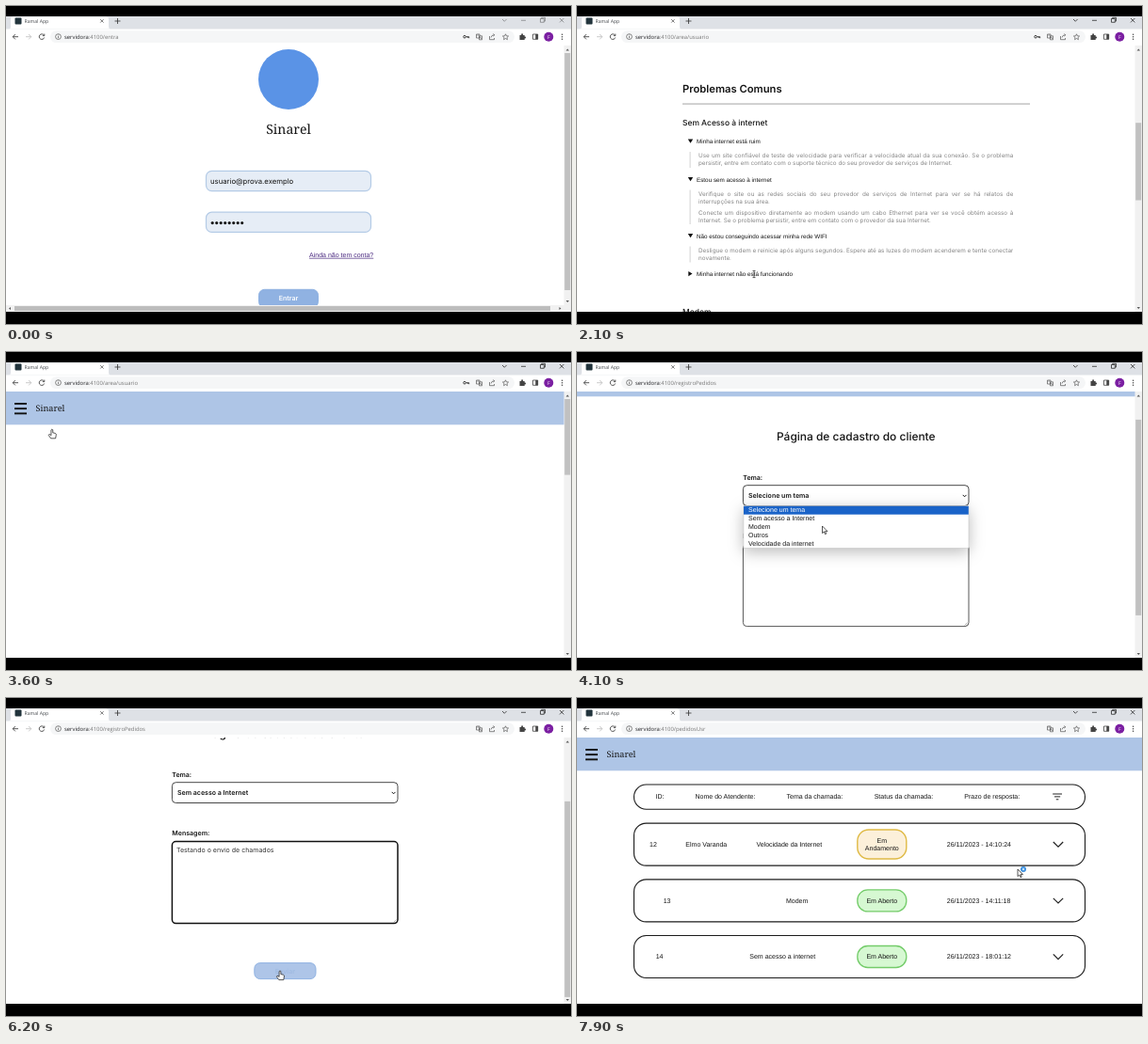
Write an HTML page that moves like this. It is 600 px wide and 338 px high and loops after 8 s.

```html
<!DOCTYPE html>
<html lang="pt-BR">
<head>
<meta charset="utf-8">
<title>Ramal App</title>
<style>
html, body { margin: 0; width: 100%; height: 100%; overflow: hidden; background: #000; }
svg { display: block; width: 100vw; height: 100vh; }
svg, p { text-rendering: geometricPrecision; }
text { font: 7.03px "Liberation Sans", Arial, sans-serif; fill: #151515; white-space: pre; }
.inter, p { font-family: Inter, sans-serif; }
.semi { font-family: Inter, sans-serif; font-weight: 600; }
.medium { font-family: Inter, sans-serif; font-weight: 500; }
.brand { font-family: "Noto Serif", serif; font-weight: 500; }
.ui { font-family: "Open Sans", sans-serif; }
.mid { text-anchor: middle; }
p { margin: 0 0 4.2px; font-size: 6.325px; line-height: 7.65px; color: #858585; text-align: justify; }
.line { fill: none; stroke: #222; stroke-width: 1; }
</style>
</head>
<body>
<svg id="stage" viewBox="0 0 600 338" preserveAspectRatio="none"></svg>
<script>
const LOOP = 8000, STEP = 100;

// ---- markup helpers
const label = (x, y, str, cls = '', size = 7.03, fill = '#151515', id = '') =>
  `<text ${id && `id="${id}"`} x="${x}" y="${y}" class="${cls}" style="font-size:${size}px;fill:${fill}">${str}</text>`;
const box = (x, y, w, h, fill, r = 0, more = '') =>
  `<rect x="${x}" y="${y}" width="${w}" height="${h}" rx="${r}" fill="${fill}" ${more}/>`;
const path = (d, more = '') => `<path d="${d}" class="line" ${more}/>`;
const group = (id, body, more = '') => `<g id="${id}" ${more}>${body}</g>`;

// ---- browser frame
const chrome = () => box(0, 11, 600, 314, '#fff') + box(0, 11, 600, 13.5, '#dee1e6') +
  path('M3 24.5Q5 24.5 5 22V14Q5 11.5 8 11.5H106Q109 11.5 109 14V22Q109 24.5 111 24.5Z', 'style="fill:#fff;stroke:none"') +
  box(9.5, 12.5, 7, 7, '#22343c', 1) +
  label(19.5, 18.2, 'Ramal App', 'ui', 5.1, '#45494d') +
  path('M100.2 14.2l3.4 3.4m0-3.4l-3.4 3.4', 'style="stroke:#444;stroke-width:.7"') +
  path('M118.5 13v6m-3-3h6', 'style="stroke:#333;stroke-width:.8"') +
  group('controls', path('M527 14l2.3 2.3 2.3-2.3M547 15.3h5M567.5 13.5h3.8v3.8h-3.8zM568.7 13.3v-1h3.8v3.8h-1M588 13l4.4 4.4m0-4.4L588 17.4', 'style="stroke-width:.75"')) +
  box(47, 26.3, 493, 12.8, '#f5f6f7', 6.4) +
  path('M13 32.7H7.3m2.6-2.7l-2.7 2.7 2.7 2.7M40.3 31a2.8 2.8 0 1 0 .4 2.5M40.8 29.6v2h-2', 'style="stroke:#444;stroke-width:.9"') +
  path('M21 32.7h5.7m-2.6-2.7l2.7 2.7-2.7 2.7', 'style="stroke:#bbb;stroke-width:.8"') +
  path('M55.5 32v2.3m0-3.7v.7M52.6 32.6a2.9 2.9 0 1 0 5.8 0a2.9 2.9 0 1 0-5.8 0', 'style="stroke:#555;stroke-width:.7"') +
  label(62, 34.9, '', 'ui', 5.9, '#777', 'address') +
  group('key', path('M485.7 32.7a1.3 1.3 0 1 0 2.6 0a1.3 1.3 0 1 0-2.6 0M488.3 32.7h3.4v1.5m-1.4-1.5v1.3', 'style="stroke:#444"')) +
  path('M499.5 30h3.5v4h-3.5zM502.5 31.8h3v4h-3zM500.4 31h1.5m1.7 2l.9 2M513.5 32v3.7h5V34M515 33.5q.3-2.7 3.6-2.7m-1.2-1.2l1.4 1.2-1.4 1.2M530.5 29.8l.9 2 2.2.2-1.6 1.5.4 2.2-1.9-1.2-1.9 1.2.4-2.2-1.6-1.5 2.2-.2z', 'style="stroke:#555;stroke-width:.7"') +
  path('M545.5 31h1.7v-.8a.9.9 0 0 1 1.8 0v.8h1.7v1.6h.5a.9.9 0 0 1 0 1.8h-.5V36h-5.2z', 'style="fill:#444;stroke:none"') +
  path('M559.5 30h5.2v5.3h-5.2z', 'style="stroke:#444;stroke-width:.8"') + box(562.3, 30, 2.6, 5.3, '#444') +
  '<circle cx="576.3" cy="32.7" r="5" fill="#7b1fa2"/>' + label(576.3, 34.8, 'F', 'ui mid', 5.2, '#fff') +
  [30.2, 32.7, 35.2].map(y => `<circle cx="590.6" cy="${y}" r=".75" fill="#444"/>`).join('');

const burger = [54, 59.2, 64.4].map(y => box(9, y, 13, 1.9, '#111')).join('');
const header = box(0, 42, 600, 35.3, '#aec5e6') + burger + label(31.6, 62.8, 'Sinarel', 'brand', 9.1);

const button = (id, x, y, w, h, str) => `<g>` +
  box(x, y, w, h, '#90b2e2', 6, `id="${id}" stroke="#8aaee0" stroke-width=".9"`) +
  label(x + w / 2, y + h / 2 + 2.4, str, 'semi mid', 7.03, '#fff', id + 'Text') + '</g>';

// ---- pages
const field = y => box(212.5, y, 175, 21.2, '#e6edf6', 6, 'stroke="#b4cbe6" stroke-width="1.2"');
const login = '<circle cx="300" cy="78" r="32" fill="#5a93e6"/>' +
  label(300, 136.4, 'Sinarel', 'brand mid', 14.05) + field(175.4) + field(219.2) +
  label(217, 188.8, 'usuario@prova.exemplo', 'inter', 7.73) +
  [...Array(8)].map((_, i) => `<circle cx="${219.2 + i * 4.5}" cy="230.6" r="1.55" fill="#151515"/>`).join('') +
  label(322, 266.8, 'Ainda não tem conta?', '', 7.03, '#4b2a80').replace('style="', 'style="text-decoration:underline;') +
  button('enter', 268.5, 301.3, 63, 19, 'Entrar') +
  box(0, 318, 600, 7, '#f1f1f1') + box(9, 319, 569, 5, '#bdbdbd') +
  path('M5 320l-2 1.5 2 1.5zM587.5 320l2 1.5-2 1.5z', 'style="fill:#555;stroke:none"');

const topics = [
  ['Minha internet está ruim', ['Use um site confiável de teste de velocidade para verificar a velocidade atual da sua conexão. Se o problema persistir, entre em contato com o suporte técnico do seu provedor de serviços de Internet.'], 900],
  ['Estou sem acesso à internet', ['Verifique o site ou as redes sociais do seu provedor de serviços de Internet para ver se há relatos de interrupções na sua área.', 'Conecte um dispositivo diretamente ao modem usando um cabo Ethernet para ver se você obtém acesso à Internet. Se o problema persistir, entre em contato com o provedor da sua Internet.'], 1400],
  ['Não estou conseguindo acessar minha rede WIFI', ['Desligue o modem e reinicie após alguns segundos. Espere até as luzes do modem acenderem e tente conectar novamente.'], 1800],
  ['Minha internet não está funcionando', ['Se ocorrer lentidão ou alguma outra dificuldade relacionada à conexão, desligue o equipamento da energia elétrica por cerca de 2 minutos. Se o problema persistir, entre em contato com o suporte técnico.'], 2200]
];
const CLOSED = 'M118.3 -3l4.2 2.6-4.2 2.6z', OPEN = 'M117.8 -2.6h5.4l-2.7 4.4z';
const topic = (id, name, paras = []) => group(id,
  path(CLOSED, `id="${id}Mark" style="fill:#111;stroke:none"`) +
  label(127, 2.2, name, '', 6.325) +
  group(id + 'Body', box(119.6, 11, 1, 19.5 * paras.length - 2.5, '#d2d2d2') +
    `<foreignObject x="129" y="12.4" width="334.4" height="45">${paras.map(s => `<p xmlns="http://www.w3.org/1999/xhtml">${s}</p>`).join('')}</foreignObject>`,
    'display="none"'));
const home = header + label(112, 347.3, 'Problemas Comuns', 'semi', 11.24) +
  box(112, 358.6, 369, .9, '#999') + label(112, 381.5, 'Sem Acesso à internet', 'medium', 8.43) +
  topics.map(([name, paras], i) => topic('topic' + i, name, paras)).join('') +
  group('modem', label(112, 3, 'Modem', 'medium', 8.43) +
    `<g transform="translate(0 20.7)">${topic('lamp', 'Não consigo conectar a Internet quando a luz do modem está piscando ou apagada.')}</g>` +
    `<g transform="translate(0 41.7)">${topic('lights', 'Luzes indicadoras do modem não estão acessas')}</g>`);

const choices = ['Selecione um tema', 'Sem acesso a Internet', 'Modem', 'Outros', 'Velocidade da internet'];
const form = header + label(296.3, 124.1, 'Página de cadastro do cliente', 'medium mid', 11.95) +
  label(176.3, 165.5, 'Tema:', 'semi') +
  box(176.4, 171.7, 239.6, 21.8, '#fff', 4, 'stroke="#333" stroke-width=".9"') +
  label(182, 185.2, '', 'semi', 7.03, '#151515', 'chosen') +
  path('M409.7 181.9l1.9 1.9 1.9-1.9', 'style="stroke:#111"') +
  label(176.3, 228, 'Mensagem:', 'semi') +
  box(176.4, 234.6, 239.6, 87, '#fff', 4, 'id="area" stroke="#444" stroke-width=".9"') +
  path('M414.5 317.5l-3 3m3-1.2l-1.3 1.3', 'style="stroke:#777;stroke-width:.5"') +
  label(181, 246, '', 'inter', 7.03, '#333', 'message') +
  button('send', 263.8, 363.6, 65.2, 17, 'Enviar') +
  group('menu', box(176.8, 193.6, 239.2, 45, '#fff', 1, 'style="filter:drop-shadow(0 4px 8px #0004)" stroke="#bbb" stroke-width=".5"') +
    box(177, 193.8, 238.8, 8.9, '#1a63c8', 0, 'id="mark"') +
    choices.map((s, i) => label(182, 200.3 + i * 8.9, s, '', 7.03, '#151515', 'choice' + i)).join(''));

const chevron = y => path(`M505.8 ${y - 2.6}l5.2 5.2 5.2-5.2`, 'style="stroke-width:1.2"');
const card = (y, h) => box(60.5, y, 479, h, '#fff', 13, 'stroke="#1c1c1c" stroke-width="1.1"');
const row = (y, cells, status, date) => card(y - 22.5, 45) +
  cells.map(([x, s]) => label(x, y + 2.4, s, 'mid')).join('') +
  (status.length > 1
    ? box(297.8, y - 15.6, 52, 31, '#fcf0da', 12, 'stroke="#dfba45" stroke-width="1.4"')
    : box(297.8, y - 11.5, 52, 23, '#d6f8d2', 11, 'stroke="#74cc6a" stroke-width="1.3"')) +
  status.map((s, i) => label(323.8, y + 2.4 + (i - (status.length - 1) / 2) * 8, s, 'mid')).join('') +
  label(392.8, y + 2.4, date) + chevron(y);
const list = header + card(92, 26.2) +
  [[83.5, 'ID:'], [125.5, 'Nome do Atendente:'], [222.5, 'Tema da chamada:'], [315.7, 'Status da chamada:'], [411.3, 'Prazo de resposta:']]
    .map(([x, s]) => label(x, 107.4, s)).join('') +
  path('M505.2 102h9.8m-8 2.9h6.2m-4.4 2.9h2.6') +
  row(155.6, [[81, '12'], [137.3, 'Elmo Varanda'], [225.3, 'Velocidade da Internet']], ['Em', 'Andamento'], '26/11/2023 - 14:10:24') +
  row(215.4, [[95.6, '13'], [233.6, 'Modem']], ['Em Aberto'], '26/11/2023 - 14:11:18') +
  row(275, [[87.6, '14'], [218.2, 'Sem acesso a internet']], ['Em Aberto'], '26/11/2023 - 18:01:12');

const scrollbar = box(592.5, 42, 7.5, 283, '#f1f1f1') + box(593.2, 50, 6, 100, '#c1c1c1', 0, 'id="thumb"') +
  path('M594.6 47.4l1.7-2 1.7 2z', 'style="fill:#555;stroke:none"') +
  path('M594.6 0l1.7 2 1.7-2z', 'id="downArrow" style="fill:#555;stroke:none"');

const pointer = 'style="fill:#fff;stroke:#111;stroke-width:.7"';
const cursors = group('arrow', path('M0 0v7.6l1.8-1.6 1.2 2.7 1.2-.5-1.2-2.6h2.5z', pointer) +
    group('busy', '<circle cx="6" cy="0" r="3" fill="#3d8fdd"/><circle cx="6" cy="0" r="1.2" fill="#bfe0ff"/>')) +
  group('hand', path('M-.9 .6Q0-.8 .9 .6V3.6L3.6 4.2Q4.6 4.5 4.4 6L3.8 9.6H-1.2L-3.6 6.2Q-3.4 4.8-2 5.5L-.9 6.4Z', pointer)) +
  group('beam', path('M-1.5-3.6h3m-1.5 0v7.2m-1.5 0h3', 'style="stroke-width:.7"'));

const pages = { login, home, form, list };
const stage = document.getElementById('stage');
stage.innerHTML = '<clipPath id="view"><rect x="0" y="42" width="600" height="283"/></clipPath>' +
  box(0, 0, 600, 338, '#000') + chrome() +
  `<g clip-path="url(#view)">${Object.entries(pages).map(([id, body]) => group(id, body)).join('')}${group('scrollbar', scrollbar)}</g>` +
  group('cursor', cursors);

// ---- timeline
const routes = [[0, 'login', '/entra'], [500, 'home', '/area/usuario'], [3700, 'form', '/registroPedidos'], [7400, 'list', '/pedidosUsr']];
const scrolls = [[0, 0], [600, 0], [900, 255], [2300, 255], [2600, 294], [3100, 294], [3400, 0], [3700, 0], [3900, 30],
  [5500, 30], [5800, 82], [6400, 82], [6700, 0], [8000, 0]];
const moves = [[200, 345, 262, 'arrow'], [400, 302, 310, 'hand'], [600, 250, 240, 'arrow'], [900, 155, 150, 'arrow'],
  [1000, 153, 174, 'arrow'], [1300, 165, 184, 'beam'], [1500, 168, 190, 'beam'], [1700, 185, 244, 'beam'], [2100, 188, 285, 'beam'],
  [2400, 190, 262, 'beam'], [2900, 192, 206.5, 'beam'], [3100, 192, 206.5, 'beam'], [3400, 17, 60, 'hand'], [3700, 60, 90, 'arrow'],
  [3900, 270, 152, 'arrow'], [4100, 260.5, 185, 'arrow'], [4300, 232, 177, 'arrow'], [4500, 240, 225, 'beam'], [5500, 240, 225, 'beam'],
  [6000, 291, 290, 'hand'], [6500, 291, 290, 'hand'], [6900, 16.5, 59.5, 'hand'], [7100, 16.5, 59.5, 'hand'], [7300, 40, 120, 'hand'],
  [7500, 120, 150, 'arrow'], [7800, 468, 182, 'arrow'], [8000, 468, 182, 'arrow']];

const $ = id => document.getElementById(id);
const show = (id, on) => $(id).setAttribute('display', on ? 'inline' : 'none');
const set = (id, attrs) => { for (const k in attrs) $(id).setAttribute(k, attrs[k]); };
const shift = (id, x, y) => set(id, { transform: `translate(${x} ${y})` });
const last = (keys, t) => keys.reduce((found, k) => k[0] <= t ? k : found, keys[0]);
const between = (t, a, b) => t >= a && t < b;

function tween(keys, t, col) {
  const a = last(keys, t), b = keys[keys.indexOf(a) + 1] || a;
  const p = a === b ? 0 : Math.max(0, (t - a[0]) / (b[0] - a[0]));
  return a[col] + (b[col] - a[col]) * p * p * (3 - 2 * p);
}

function hover(id, on) {
  set(id, { fill: on ? '#aec5e8' : '#90b2e2' });
  $(id + 'Text').style.fill = on ? '#a0bbe2' : '#fff';
}

function layoutTopics(t) {
  let y = 399, extra = 0;
  topics.forEach(([, paras, openAt], i) => {
    const open = t >= openAt, grow = open ? 19.5 * paras.length : 0;
    shift('topic' + i, 0, y);
    show(`topic${i}Body`, open);
    set(`topic${i}Mark`, { d: open ? OPEN : CLOSED });
    y += 21 + grow;
    extra += grow;
  });
  shift('modem', 0, y + 19);
  return 840 + extra;
}

function layoutForm(t) {
  const menuOpen = between(t, 4000, 4400), pick = t >= 4300 ? 1 : 0;
  show('menu', menuOpen);
  set('mark', { y: 193.8 + pick * 8.9 });
  choices.forEach((_, i) => $('choice' + i).style.fill = i === pick ? '#fff' : '#151515');
  $('chosen').textContent = choices[t >= 4400 ? 1 : 0];
  const text = 'Testando o envio de chamados';
  $('message').textContent = text.slice(0, Math.max(0, Math.round((t - 4600) / 900 * text.length)));
  const focused = between(t, 4600, 6400);
  set('area', { stroke: focused ? '#111' : '#444', 'stroke-width': focused ? 1.5 : .9 });
  hover('send', between(t, 5900, 6500));
}

function draw(t) {
  const [, page, route] = last(routes, t);
  for (const id in pages) show(id, id === page);
  $('address').innerHTML = `<tspan fill="#202124" style="fill:#202124">servidora</tspan>:4100${route}`;
  show('key', page === 'login' || page === 'home');
  set('controls', { opacity: t < 200 ? .5 : 1 });

  const scroll = tween(scrolls, t, 1);
  shift(page, 0, -scroll);
  const height = layoutTopics(t);
  layoutForm(t);
  hover('enter', between(t, 400, 500));

  show('scrollbar', page !== 'list');
  const track = page === 'login' ? 260 : 267;
  const ratio = page === 'home' ? track / height : .73;
  const size = { login: 252, home: 283 * ratio, form: 208 }[page] || 0;
  set('thumb', { y: 50 + scroll * ratio, height: size });
  shift('downArrow', 0, page === 'login' ? 313 : 320);

  show('cursor', t >= 200);
  const kind = last(moves, t)[3];
  for (const id of ['arrow', 'hand', 'beam']) show(id, id === kind);
  show('busy', t >= 7500);
  shift('cursor', tween(moves, t, 1), tween(moves, t, 2));
}

let start, shown = -1;
function tick(now) {
  start ??= now;
  const t = Math.floor((now - start) % LOOP / STEP) * STEP;
  if (t !== shown) draw(shown = t);
  requestAnimationFrame(tick);
}
draw(0);
requestAnimationFrame(tick);
</script>
</body>
</html>
```
